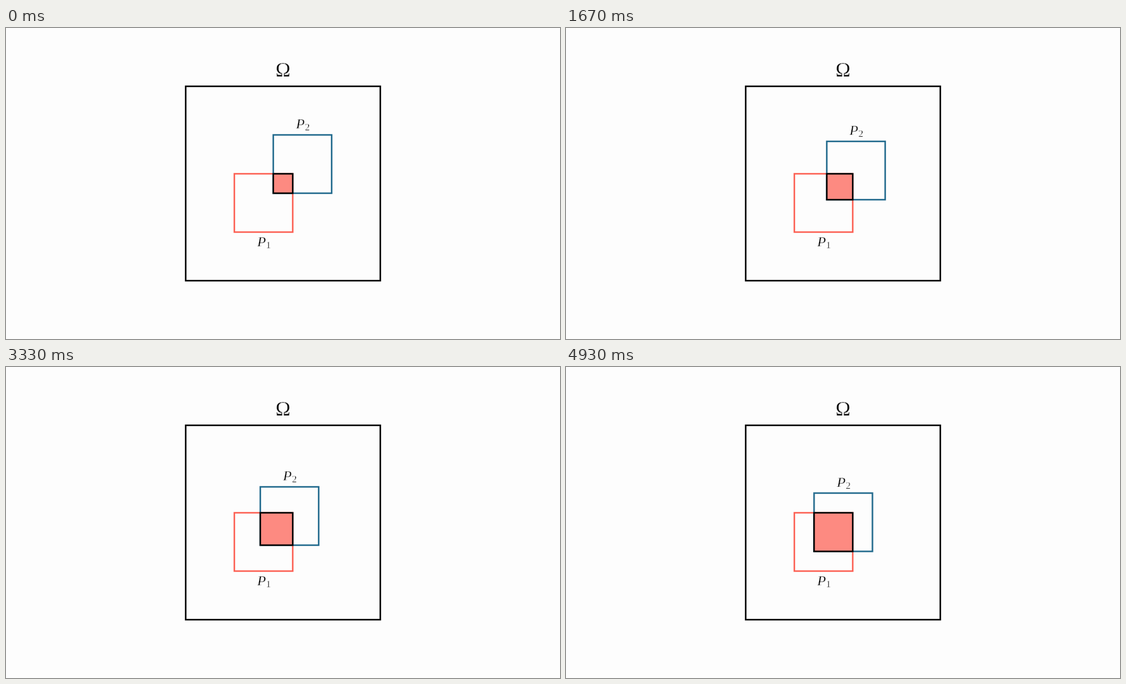
Animation, 854 px wide and 480 px high, one loop 5 s. Source, as an HTML page:

```html
<!DOCTYPE html>
<html lang="en">
<head>
<meta charset="utf-8">
<title>Overlapping squares</title>
<style>
  :root { --paper: #fdfdfd; }
  html, body { margin: 0; width: 100%; height: 100%; overflow: hidden; background: var(--paper); }
  svg { display: block; width: 854px; height: 480px; }
  rect { fill: none; stroke: #000; stroke-width: 2.4; }
  /* a paper-coloured edge thins the letter strokes */
  text { font-family: "Liberation Serif", "Times New Roman", serif; fill: #000; stroke: var(--paper); stroke-width: .35; }
  .omega { font-size: 31px; text-anchor: middle; }
  .label { font-size: 22px; font-style: italic; }
  .sub { font-size: 15px; font-style: normal; }
  #first { stroke: #fc6255; }
  #second { stroke: #236b8e; }
  #overlap { fill: #fd8a81; }
</style>
</head>
<body>
<svg viewBox="0 0 854 480">
  <text class="omega" x="427" y="75">Ω</text>
  <rect x="277" y="90" width="300" height="300"/>
  <rect id="first" x="352" y="225" width="90" height="90"/>
  <text class="label" x="387.3" y="336.8">P<tspan class="sub" x="400.8" y="339.8">1</tspan></text>
  <g id="mover">
    <rect id="second" x="412" y="165" width="90" height="90"/>
    <text class="label" x="447" y="155.2">P<tspan class="sub" x="460.8" y="158.3">2</tspan></text>
  </g>
  <rect id="overlap" x="412" y="225" width="30" height="30"/>
</svg>
<script>
  const LOOP = 5000, STEPS = 75, TRAVEL = 30;
  const mover = document.getElementById('mover');
  const overlap = document.getElementById('overlap');
  const start = performance.now();

  function draw(now) {
    const t = Math.max(0, now - start) % LOOP;
    // 15 steps per second, switching on times rounded to 10 ms
    const step = Math.floor((t + 5) * STEPS / LOOP) % STEPS;
    const d = TRAVEL * step / STEPS;
    mover.setAttribute('transform', `translate(${-d} ${d})`);
    overlap.setAttribute('x', 412 - d);
    overlap.setAttribute('width', 30 + d);
    overlap.setAttribute('height', 30 + d);
    requestAnimationFrame(draw);
  }
  draw(start);
</script>
</body>
</html>
```
